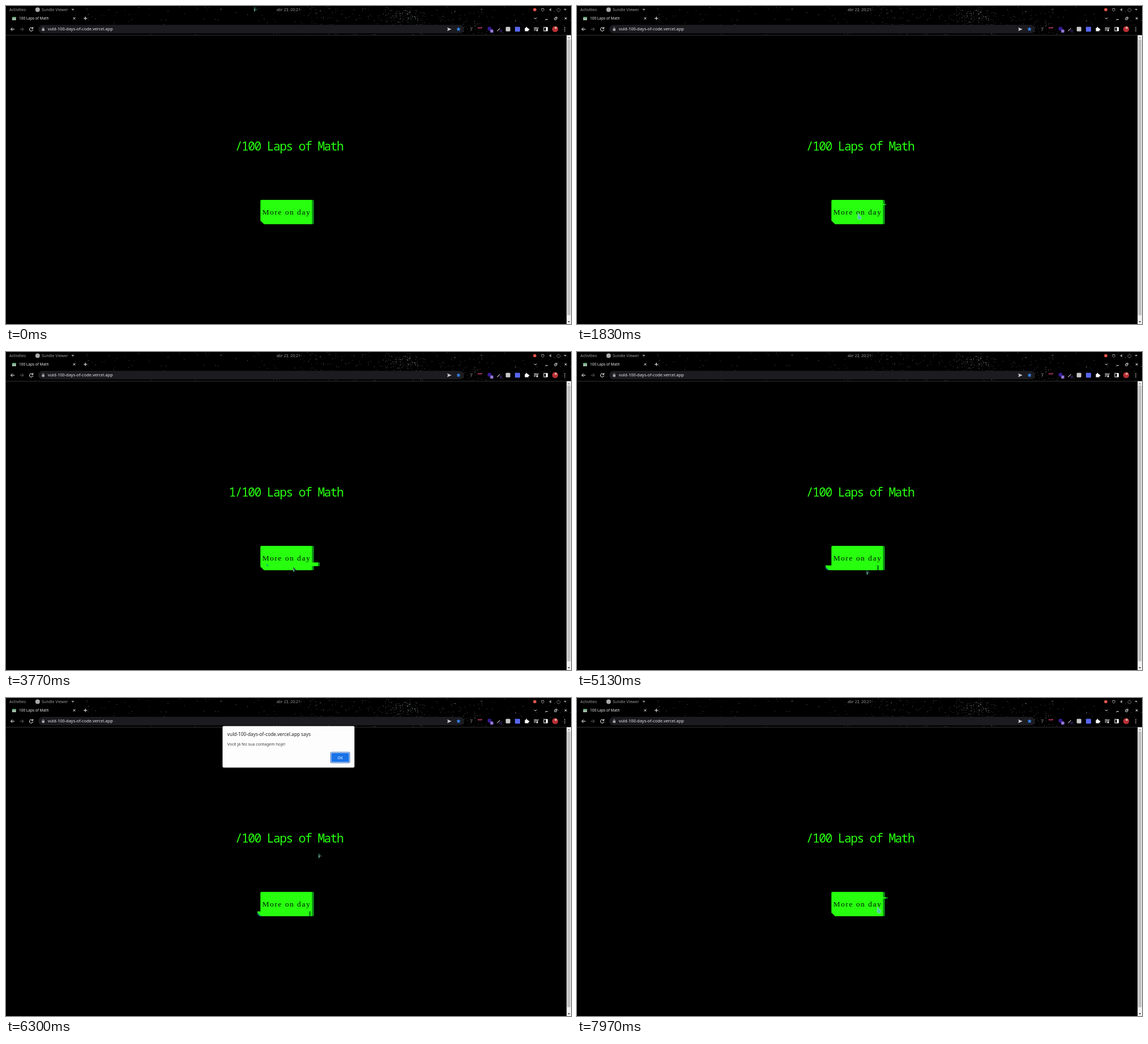
Animation, 998 px wide and 561 px high, one loop 8000 ms. Source, as an HTML page with a canvas:

```html
<!DOCTYPE html>
<html lang="en">
<head>
<meta charset="utf-8">
<title>Day counter</title>
<style>
html, body { margin: 0; width: 100%; height: 100%; overflow: hidden; background: #000; }
canvas { display: block; }
</style>
</head>
<body>
<canvas id="stage" width="998" height="561"></canvas>
<script>
const ctx = document.getElementById('stage').getContext('2d');
const LOOP = 8000;
const SCALE = 0.52; // page pixels to stage pixels
const SANS = '"Noto Sans", sans-serif';
const MONO = '"Noto Sans Mono", monospace';
const SERIF = '"Liberation Serif", serif';
const GREEN = '#27ff0f', SHADE = '#0c8a16', STRIPE = '#079a80';
const SITE = 'vuld-100-days-of-code.vercel.app';
const BUTTON = { x: 449.2, y: 342.1, w: 91.5, h: 43 };
const DIALOG = { open: 6045, close: 7500 };
const HOVER_STARTS = [1520, 2960, 5125, 7850];

// Places the pointer visits
const PANEL = { x: 438, y: 1 };
const CLOCK = { x: 515, y: 1 };
const LABEL = { x: 496, y: 366 };
const BELOW = { x: 496, y: 399 };
const ASIDE = { x: 518, y: 392 };
const AWAY = { x: 640, y: 128 };
const NEAR_OK = { x: 617, y: 104 };
const OK = { x: 592, y: 103 };
const LABEL_END = { x: 530.5, y: 369 };
const MOVES = [
  { start: 800, end: 1180, to: CLOCK },
  { start: 1200, end: 1600, to: LABEL },
  { start: 2330, end: 2530, to: BELOW },
  { start: 2870, end: 3070, to: LABEL },
  { start: 3680, end: 3860, to: ASIDE },
  { start: 5040, end: 5290, to: LABEL },
  { start: 6080, end: 6600, to: AWAY },
  { start: 6700, end: 7200, to: NEAR_OK },
  { start: 7300, end: 7430, to: OK },
  { start: 7510, end: 7930, to: LABEL_END }
];

function text(str, x, y, size, color, family = SANS, spacing = 0) {
  ctx.font = `${size}px ${family}`;
  ctx.letterSpacing = spacing + 'px';
  ctx.fillStyle = color;
  ctx.fillText(str, x, y);
}
function rect(x, y, w, h, color, radius = 0) {
  ctx.fillStyle = color;
  ctx.beginPath();
  ctx.roundRect(x, y, w, h, radius);
  ctx.fill();
}
function dot(x, y, r, color) {
  ctx.fillStyle = color;
  ctx.beginPath();
  ctx.arc(x, y, r, 0, 7);
  ctx.fill();
}
function fill(d, color) {
  ctx.fillStyle = color;
  ctx.fill(new Path2D(d));
}
function stroke(d, color = '#fff', width = 1) {
  ctx.strokeStyle = color;
  ctx.lineWidth = width;
  ctx.stroke(new Path2D(d));
}

let seed = 23;
function random() {
  seed = (seed * 16807) % 2147483647;
  return seed / 2147483647;
}
// Spread evenly over the header, then denser right of the middle, then a bright cluster
const bell = () => random() + random() + random() - 1.5;
const stars = Array.from({ length: 560 }, (_, i) => {
  const clustered = i >= 450;
  const x = clustered ? 700 + bell() * 32 : i < 250 ? 110 + random() * 888 : 520 + random() * 330;
  const y = clustered ? 18 + bell() * 13 : random() * 50;
  return { x, y, alpha: 0.2 + random() * 0.55, size: random() < 0.1 ? 1.3 : 0.8 };
});

function drawPanel(clockHover) {
  for (const s of stars) rect(s.x, s.y, s.size, s.size, `rgba(225,240,235,${s.alpha})`);
  if (clockHover) rect(468, 0, 62, 13, '#0c100f', 6);
  const dim = '#9b9b9b';
  text('Activities', 6, 9.4, 7, dim);
  dot(55.8, 6.6, 4, '#aaa');
  text('Sundle Viewer', 63, 9.4, 7, dim);
  text('abr 23  20:21', 478, 9.4, 6.9, dim);
  for (const x of [118, 987.7]) fill(`M${x} 8l-2.5-3h5z`, dim);
  dot(934, 6.5, 2.8, '#e8564c');
  stroke('M946 4.5h4v3l-2 2l-2-2z', '#999');
  fill('M959.5 5.5h1.5l2-2v6l-2-2h-1.5z', '#999');
  stroke('M974.5 4.5a3 3 0 1 0 3 0M976 3v3', '#888', 0.8);
}

function drawTabs() {
  rect(11, 19, 6.5, 6, '#d6e5d9');
  rect(11, 19, 6.5, 1.6, '#258044');
  stroke('M11 22.7h6.5M14.2 20.5v4.5', '#397b50', 0.7);
  text('100 Laps of Math', 23, 24.3, 6.5, '#e8eaed');
  for (const x of [118.7, 986.9]) stroke(`M${x} 20l3.6 3.6m0-3.6l-3.6 3.6`);
  stroke('M137.2 21.8h6m-3-3v6M933 20.7l2.2 2.2l2.2-2.2M952.5 23.8h4.5');
  stroke('M968.8 21h3.2v3.2h-3.2zM970.3 19.7h3v3', '#fff', 0.8);
}

function drawStar(x, y, color) {
  const tips = Array.from({ length: 10 }, (_, i) => {
    const r = i % 2 ? 1.8 : 4.2, a = i * Math.PI / 5;
    return `${x + r * Math.sin(a)} ${y - r * Math.cos(a)}`;
  });
  fill(`M${tips.join('L')}Z`, color);
}

function drawToolbar() {
  rect(57, 33.3, 752, 15, '#1b1b20', 7.5);
  stroke('M15 41h-6.5m3-3l-3 3l3 3');
  stroke('M24.5 41h6.5m-3-3l3 3l-3 3', '#666');
  stroke('M46.8 39a3.1 3.1 0 1 0 .8 2.6m0-4.6v2.8h-2.8');
  rect(63.4, 40, 4.6, 3.8, '#aaa', 0.6);
  stroke('M64.4 40v-1a1.3 1.3 0 0 1 2.6 0v1', '#aaa', 0.8);
  text(SITE, 73.7, 43.2, 7.45, '#e8eaed');
  fill('M779.3 37.8l7.7 3.2l-7.7 3.2l1.2-3.2z', '#ccc');
  drawStar(799.3, 41, '#3484f0');

  stroke('M819.5 38.5h4.5l-3 3h2l-2.5 3', '#777', 0.8);
  rect(833, 37.7, 8, 1.6, '#c83b70');
  dot(854, 40, 3.5, '#351c94');
  rect(855, 41.4, 6, 5.6, '#7656bd', 1);
  text('2', 856.5, 46.1, 5, '#fff');
  stroke('M867.5 44.2l5-5', '#999', 1.5);
  rect(871.5, 41.5, 5, 5, '#251642', 1);
  rect(882.7, 36.7, 8, 8, '#c8c8c8', 1.5);
  rect(899, 36.7, 9, 8.5, '#5867ef', 1);
  rect(916.5, 39, 6, 5.6, '#fff', 0.6);
  dot(919.3, 38.5, 1.5, '#fff');
  dot(923, 41.6, 1.4, '#fff');
  stroke('M932.5 38.4h5.5m-5.5 2.3h5.5m-5.5 2.3h3m3.5 .5v-5h1.7');
  dot(938, 43.3, 1.3, '#fff');
  stroke('M950 37.7h6.6v6.3h-6.6z');
  rect(953.6, 37.7, 3, 6.3, '#fff');
  dot(970, 40.7, 5.3, '#b92e35');
  dot(971, 38.4, 2, '#d8b19b');
  for (const y of [38, 41, 44]) dot(987, y, 0.8, '#fff');
}

function drawPage(count) {
  rect(0, 51, 998, 510, '#000');
  rect(0, 51, 998, 0.8, '#404042');
  rect(990.2, 51.6, 7.8, 509.4, '#f1f1f1');
  rect(991.4, 59, 5.6, 486.5, '#c1c1c1');
  fill('M992 57h4.4l-2.2-2.5z', '#888');
  fill('M992 556h4.4l-2.2 2.5z', '#444');
  const size = 21.5, advance = 11.2;
  text(count + '/100 Laps of Math', 404.8 - count.length * advance, 254.8, size, GREEN, MONO, advance - size * 0.6);
}

// Button face with its lower left corner cut off
function drawFace(glitching) {
  const { x, y, w, h } = BUTTON;
  const cut = (w + h) * 0.05, edge = (w + h) * 0.03;
  rect(x + w - 3, y, 6.2, h, SHADE, 2);
  ctx.save();
  ctx.beginPath();
  ctx.roundRect(x, y, w, h, 2);
  ctx.clip();
  fill(`M${x} ${y}h${w}v${h}h${cut - w}l${-cut} ${-cut}z`, GREEN);
  if (glitching) fill(`M${x} ${y + h - cut}l${cut} ${cut}h${edge - cut}l${-edge} ${-edge}z`, STRIPE);
  ctx.restore();
  const label = (shift, color) =>
    text('More on day', 452.8 + shift, 368 + shift, 13.4, color, SERIF, 3 * SCALE);
  if (glitching) {
    label(3 * SCALE, STRIPE);
    label(-3 * SCALE, '#d9f005');
  }
  label(0, '#031503');
}

// Slice of the face at each tenth of a run: alternating high and low strips
// whose shift dies down, then wide jumps of a lower strip
function glitchKey(i) {
  const odd = i % 2 === 1;
  if (i < 6) {
    const fade = 10 - 2.5 * (i - 1);
    return odd ? { top: 10, bottom: 85, dx: fade, dy: fade }
               : { top: 80 - 7 * i, bottom: 7 * i, dx: -20 / 2 ** (i / 2), dy: 0 };
  }
  const drop = i < 8 ? 35 : 0;
  return odd ? { top: 80 - drop, bottom: drop, dx: -10, dy: 0 }
             : { top: 80 - drop, bottom: 5 + drop, dx: 20, dy: -10 };
}

function drawGlitch(progress) {
  const step = Math.floor(progress * 10);
  const from = glitchKey(step), to = glitchKey(step + 1);
  const mix = progress * 10 - step >= 0.5 ? 0.5 : 0;
  const at = name => from[name] + (to[name] - from[name]) * mix;
  const { x, y, w, h } = BUTTON;
  ctx.save();
  ctx.translate(at('dx') * SCALE, at('dy') * SCALE);
  ctx.beginPath();
  ctx.rect(x, y + h * at('top') / 100, w + 6 * SCALE, h * (100 - at('top') - at('bottom')) / 100);
  ctx.clip();
  drawFace(true);
  ctx.restore();
}

function drawDialog() {
  rect(382.5, 49.6, 233, 73.2, '#fdfdfd', 2);
  text(SITE + ' says', 390.8, 67.3, 8.3, '#202124');
  text('Você já fez sua contagem hoje!', 390.8, 84, 7.1, '#3c4043');
  rect(573, 95.2, 34.6, 19.6, '#174fa8', 2.5);
  rect(573.8, 96, 33, 18, '#d7e7ff', 2);
  rect(574.8, 97, 31, 16, '#1a73e8', 1.5);
  text('OK', 585.8, 107.5, 6.5, '#fff');
}

function drawPointer({ x, y }, hand) {
  ctx.save();
  ctx.translate(x, y);
  if (hand) {
    const shape = 'M.2 .8q1-1.2 1.9 0l.5 3.4l2.6 .8q1 .5 .7 2l-.8 3.6h-3.6l-2.6-3.6q.1-1.4 1.6-.4z';
    stroke(shape, '#d5fbe9', 0.7);
    fill(shape, '#4cc7ab');
  } else {
    fill('M0 0l6 6.3h-3l-2 3.5z', '#243b3b');
    fill('M0 2.5l1.8 3.5l-1 3.8z', '#8cf0cf');
    stroke('M0 .3l5.8 6', '#317b68', 0.6);
  }
  ctx.restore();
}

function pointerAt(t) {
  let { x, y } = PANEL;
  for (const { start, end, to } of MOVES) {
    const u = Math.min(1, Math.max(0, (t - start) / (end - start)));
    const eased = u * u * (3 - 2 * u);
    x += (to.x - x) * eased;
    y += (to.y - y) * eased;
  }
  return { x, y };
}

function draw(t) {
  const pointer = pointerAt(t);
  const { x, y, w, h } = BUTTON;
  const overColumn = pointer.x > x && pointer.x < x + w && pointer.y > y;
  const overButton = overColumn && pointer.y < y + h;
  const dialogOpen = t >= DIALOG.open && t < DIALOG.close;
  const count = t < 1950 || t >= 4800 ? '' : t < 3400 ? '0' : '1';
  // The open dialog holds the page still
  const pageTime = dialogOpen ? DIALOG.open : t;
  const hover = HOVER_STARTS.find(start => pageTime >= start && pageTime < start + 1000);

  rect(0, 0, 998, 561, '#000');
  drawPanel(pointer.x > 468 && pointer.x < 530 && pointer.y < 13);
  drawTabs();
  drawToolbar();
  drawPage(count);
  drawFace(false);
  if (hover && (dialogOpen || overButton)) drawGlitch((pageTime - hover) / 1000);
  if (dialogOpen) drawDialog();
  drawPointer(pointer, overColumn && pointer.y < y + h * 0.8);
}

function frame() {
  draw(performance.now() % LOOP);
  requestAnimationFrame(frame);
}
frame();
</script>
</body>
</html>
```
